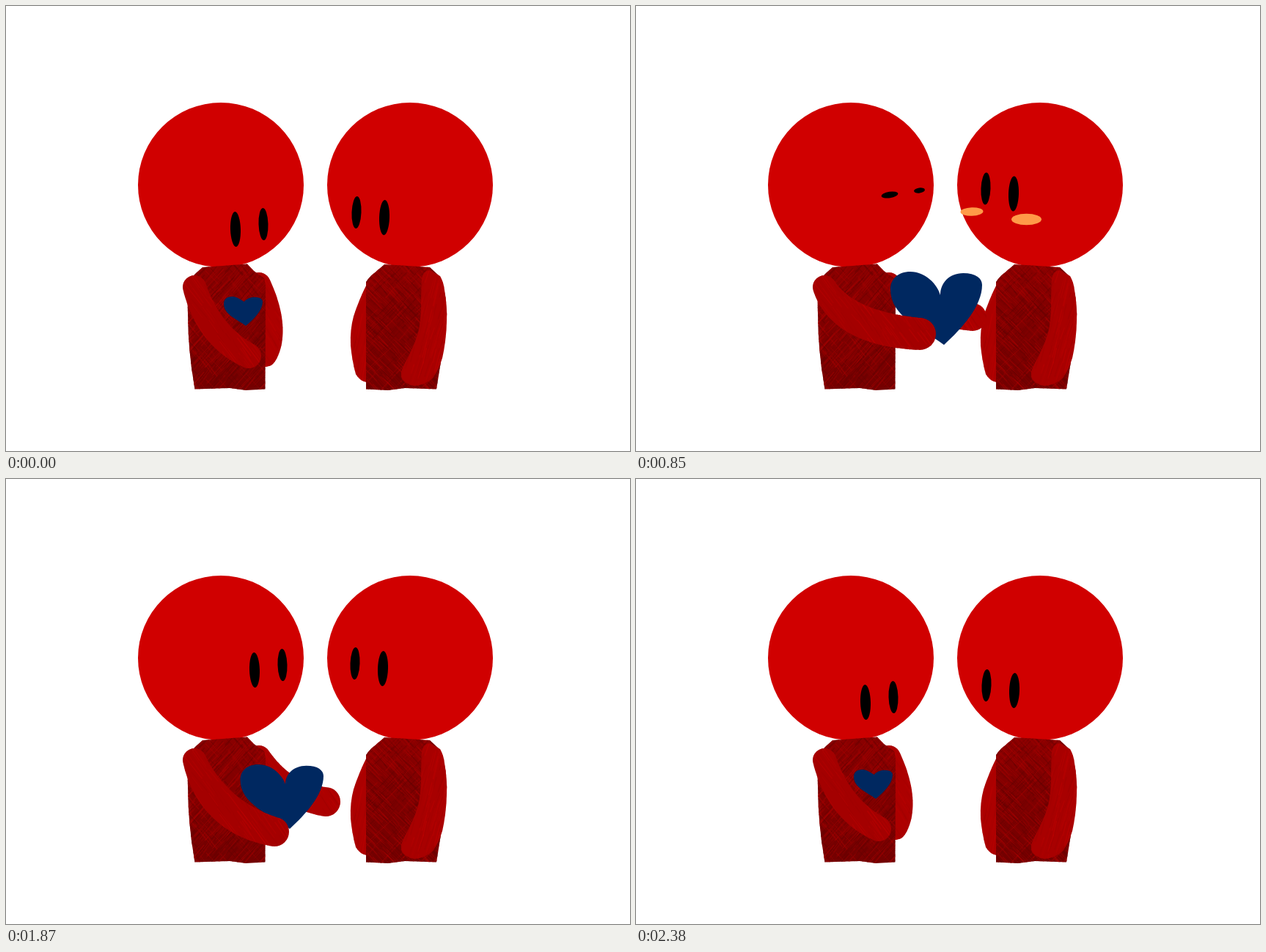
Recreate the animation shown at these times as an HTML page with a canvas. Size 851 by 608 pixels, loop 2.55 s.

```html
<!DOCTYPE html>
<html lang="en">
<head>
<meta charset="utf-8">
<title>Giving a heart</title>
<style>
  html, body { margin: 0; width: 100%; height: 100%; overflow: hidden; background: #fff; }
  canvas { display: block; }
</style>
</head>
<body>
<canvas id="stage" width="851" height="608"></canvas>
<script>
const ctx = document.getElementById('stage').getContext('2d');
const STEP = 170, STEPS = 15;
const RED = '#d00000', BLUE = '#002860', BLUSH = '#ff9a48';

const BODY_L = new Path2D('M268 357 L329 352.5 L338 362 L352 372 L354 381 L353.5 523.5 L327 525 L305 522 L257.5 523.5 Q248 470 248 420 Q246 385 257 367 Z');
const BODY_R = new Path2D('M516 353 L578 357 L590 368 L594 480 L587 523.5 L544 522 L521 525 L491 523.5 L491 377 Q497 368 505 363 Z');
const BACK_R = new Path2D('M515 355 Q500 364 493 378 Q481 402 474 424 Q469 442 470 464 Q472 485 477 503 Q483 513 492 514 L510 500 Z');
const FRONT_R = new Path2D('M567 372 Q570 361 578 361 L592 369 Q597 378 598 388 Q602 410 601 432 Q600 460 595 481 Q590 497 582 508 Q572 518 557 519 Q544 517 539 507 Q538 498 544 488 Q556 466 562 447 Q567 425 566 400 Z');

// heart: left, right, top, notch x y, tip x y
// front, back: control point, hand centre, hand radius, bulge
// eyes: near eye x y, far eye x y, heights; look: right figure's eye offset
const POSES = [
  { heart: [297, 350, 397, 325, 404, 327, 437], front: [277, 451, 331, 478, 17, 1.5], back: [364, 443, 354, 478, 15, 5],
    eyes: [313, 305, 351, 298], look: [0, 0] },
  { heart: [299, 382, 399, 342, 417, 349, 457], front: [284, 459, 343, 480, 17, 2], back: [379, 418, 382, 471, 17, 2],
    eyes: [319, 300, 357, 293], look: [0, 0] },
  { heart: [301, 405, 400, 357, 427, 367, 476], front: [290, 473, 355, 493, 21, 2.5], back: [385, 402, 403, 464, 18, 0],
    eyes: [331, 285, 369, 278], look: [-2, -14] },
  { heart: [319.5, 433, 390, 381, 417, 387, 478], front: [284, 462, 366, 482, 20, 4], back: [380, 434, 436, 441, 20, 0],
    eyes: [339, 261, 377, 254], look: [-2, -30] },
  { heart: [333, 453, 376, 398, 406, 404, 470], front: [284, 453, 377, 464, 21, 3.5], back: [385, 430, 449, 432, 19, 0],
    eyes: [346, 257, 385, 252], squint: [8, 9, 7, 8], look: [-1, -32.5] },
  { heart: [347, 472, 363, 415, 395, 420, 463], front: [284, 441, 387, 448, 22, 3], back: [390, 420, 459, 425, 19, 0],
    eyes: [346, 258, 386.5, 252], squint: [11.5, 4.3, 7.5, 3.5], look: [-1, -32.5], blush: true }
];
const HALF = { ...POSES[5], eyes: POSES[4].eyes, squint: POSES[4].squint };
const OPEN = { ...POSES[5], eyes: [346, 256, 385, 251], squint: [7, 22, 6.5, 21] };
POSES.push(HALF, OPEN);

function seeded(n) {
  return () => (n = (n * 16807) % 2147483647) / 2147483647;
}

function fill(path, color) {
  ctx.fillStyle = color;
  ctx.fill(path);
}

function oval(x, y, rx, ry, color, tilt = 0) {
  ctx.beginPath();
  ctx.ellipse(x, y, rx, ry, tilt, 0, Math.PI * 2);
  ctx.fillStyle = color;
  ctx.fill();
}

// Crayon look: strokes in one main direction, clipped to a shape.
function crayon(path, base, inks, [x, y, w, h], angle, count, seed, cross = 0) {
  const rnd = seeded(seed);
  ctx.save();
  ctx.clip(path);
  ctx.fillStyle = base;
  ctx.fillRect(x, y, w, h);
  ctx.globalAlpha = 0.5;
  for (let i = 0; i < count; i++) {
    const a = (rnd() < cross ? -angle : angle) + (rnd() - 0.5) * 0.15;
    const px = x + rnd() * w, py = y + rnd() * h, len = 6 + rnd() * 18;
    ctx.strokeStyle = inks[Math.floor(rnd() * inks.length)];
    ctx.lineWidth = 0.6 + rnd();
    ctx.beginPath();
    ctx.moveTo(px - Math.cos(a) * len, py - Math.sin(a) * len);
    ctx.lineTo(px + Math.cos(a) * len, py + Math.sin(a) * len);
    ctx.stroke();
  }
  ctx.restore();
}

// A limb is a row of discs along a quadratic curve.
function limb(x0, y0, [cx, cy, x1, y1, r1, bulge], r0 = 16) {
  const path = new Path2D();
  for (let i = 0; i <= 60; i++) {
    const t = i / 60, u = 1 - t;
    const x = u * u * x0 + 2 * u * t * cx + t * t * x1;
    const y = u * u * y0 + 2 * u * t * cy + t * t * y1;
    const r = u * r0 + t * r1 + 4 * u * t * bulge;
    path.moveTo(x + r, y);
    path.arc(x, y, r, 0, Math.PI * 2);
  }
  return path;
}

function heart([l, r, top, nx, ny, tx, ty]) {
  const h = ty - top, pl = l + 0.4 * (nx - l), pr = nx + 0.55 * (r - nx);
  const at = k => top + k * h;
  const p = new Path2D();
  p.moveTo(nx, ny);
  p.bezierCurveTo(nx - 0.06 * (nx - l), at(0.17), pl + 0.3 * (nx - l), top, pl, top);
  p.bezierCurveTo(l + 0.15 * (nx - l), top, l, at(0.1), l, at(0.24));
  p.bezierCurveTo(l, at(0.62), l + 0.59 * (tx - l), at(0.77), tx, ty);
  p.bezierCurveTo(tx + 0.48 * (r - tx), at(0.77), r, at(0.47), r, at(0.18));
  p.bezierCurveTo(r, at(0.09), r - 0.15 * (r - nx), at(0.02), pr, at(0.02));
  p.bezierCurveTo(nx + 0.2 * (r - nx), at(0.02), nx, at(0.16), nx, ny);
  return p;
}

function bodyShade() {
  const g = ctx.createLinearGradient(0, 353, 0, 525);
  g.addColorStop(0, '#8a0000');
  g.addColorStop(1, '#740000');
  return g;
}

function draw(pose) {
  const bodyInks = ['#640000', '#700000', '#980000', '#a80000'];
  const armInks = ['#9c0000', '#a40000', '#b60000', '#c00000'];
  ctx.fillStyle = '#fff';
  ctx.fillRect(0, 0, 851, 608);

  crayon(BACK_R, '#ac0000', armInks, [465, 350, 50, 170], 1.75, 120, 31);
  crayon(limb(345, 380, pose.back), '#ac0000', armInks, [325, 355, 160, 145], 1, 220, 47);

  oval(293, 244.5, 113, 112.5, RED);
  oval(551, 244.5, 113, 112.5, RED);
  crayon(BODY_L, bodyShade(), bodyInks, [240, 350, 120, 178], -0.85, 700, 11, 0.25);
  crayon(BODY_R, bodyShade(), bodyInks, [485, 350, 115, 178], 0.8, 700, 23, 0.25);
  crayon(FRONT_R, '#a80000', armInks, [535, 355, 70, 168], 1.85, 180, 59);

  fill(heart(pose.heart), BLUE);
  crayon(limb(257, 384, pose.front), '#a40000', armInks, [235, 360, 180, 160], 0.95, 320, 71);

  const [ax, ay, bx, by] = pose.eyes;
  const [aw, ah, bw, bh] = pose.squint || [7, 24, 6.5, 22];
  const tilt = ah < 6 ? -0.15 : -0.03;
  oval(ax, ay, aw, ah, '#000', tilt);
  oval(bx, by, bw, bh, '#000', tilt);

  const [dx, dy] = pose.look;
  oval(478 + dx, 282 + dy, 6.5, 22, '#000', 0.04);
  oval(516 + dx, 289 + dy, 7, 24, '#000', 0.03);
  if (pose.blush) {
    oval(458, 281, 15.5, 5.8, BLUSH, -0.04);
    oval(532.5, 291.5, 20.5, 7.8, BLUSH);
  }
}

const start = performance.now();
let shown = -1;
function tick() {
  const step = Math.floor((performance.now() - start) / STEP) % STEPS;
  const index = Math.min(step, STEPS - 1 - step);
  if (index !== shown) draw(POSES[shown = index]);
  requestAnimationFrame(tick);
}
tick();
</script>
</body>
</html>
```
